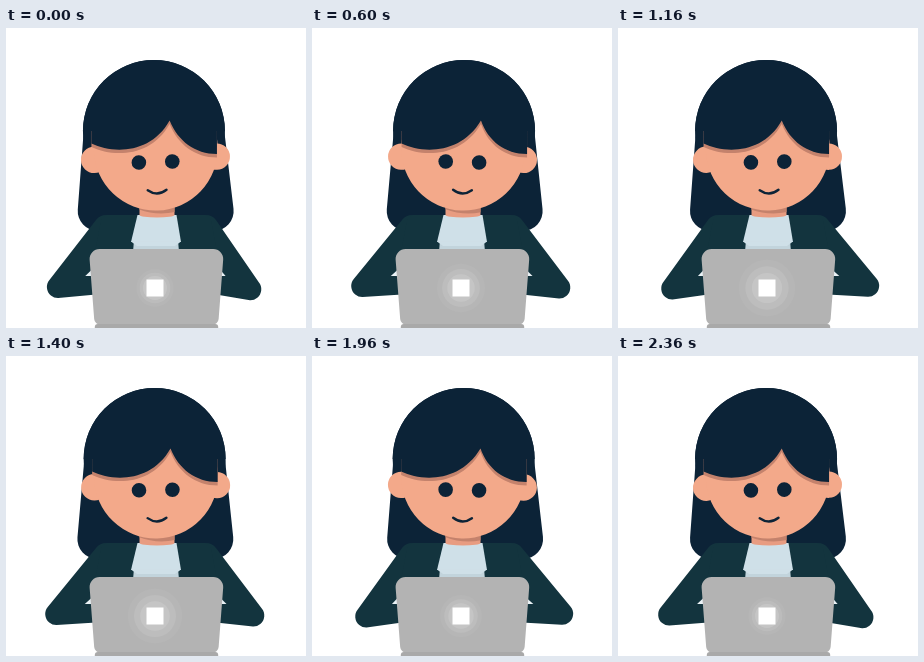
Recreate the animation shown at these times as an HTML page with a canvas. Size 300 by 300 pixels, loop 2400 ms.

```html
<!DOCTYPE html>
<html lang="en">
<head>
<meta charset="utf-8">
<style>
html, body { margin: 0; width: 100%; height: 100%; overflow: hidden; background: #fff; }
canvas { display: block; width: 300px; height: 300px; }
</style>
</head>
<body>
<canvas id="stage"></canvas>
<script>
const canvas = document.getElementById('stage');
const ctx = canvas.getContext('2d');
const ratio = window.devicePixelRatio || 1;
canvas.width = canvas.height = 300 * ratio;

const HAIR = '#0c2337', SKIN = '#f3a98a', NECK = '#e89c81', SHADE = '#c4826c';
const JACKET = '#13343e', SHIRT = '#cfe0e8', SHIRT_DARK = '#c2d4dc', METAL = '#b3b3b3';
const LOOP = 2400, STEP = 40, MIDDLE = 150;

// Swings between -1 and 1, reaching 1 at time `peak`.
const swing = (t, period, peak) => Math.cos((t - peak) / period * 2 * Math.PI);

function fill(color, build) {
  ctx.fillStyle = color;
  ctx.beginPath();
  build();
  ctx.fill();
}

const disc = (color, x, y, r) => fill(color, () => ctx.arc(x, y, r, 0, Math.PI * 2));

function pair(color, x, half, y, r) {
  for (const side of [-1, 1]) disc(color, x + side * half, y, r);
}

// Symmetric trapezoid; `top` and `bottom` give y, half width and corner radius.
function trapezoid(color, topX, top, bottomX, bottom) {
  const [y1, w1, r1] = top, [y2, w2, r2] = bottom;
  fill(color, () => {
    ctx.moveTo(topX, y1);
    ctx.arcTo(topX + w1, y1, bottomX + w2, y2, r1);
    ctx.arcTo(bottomX + w2, y2, bottomX - w2, y2, r2);
    ctx.arcTo(bottomX - w2, y2, topX - w1, y1, r2);
    ctx.arcTo(topX - w1, y1, topX, y1, r1);
    ctx.closePath();
  });
}

function transformed(build, x, y, angle = 0, flip = 1) {
  ctx.save();
  ctx.translate(x, y);
  ctx.rotate(angle);
  ctx.scale(flip, 1);
  build();
  ctx.restore();
}

function backHair(head, tips) {
  disc(HAIR, MIDDLE + head, 103, 71);
  trapezoid(HAIR, MIDDLE + head, [100, 70, 0], MIDDLE + tips, [203, 80, 20]);
}

// Drawn outwards from the body's axis; `reach` moves the elbow out and up.
function arm(side, reach) {
  transformed(() => {
    fill(JACKET, () => {
      ctx.moveTo(20, 187);
      ctx.lineTo(50, 187);
      ctx.quadraticCurveTo(56, 187, 60, 192);
      ctx.arc(97.3 + reach, 259.5 - reach * 0.6, 11, -0.69, 1.6);
      ctx.lineTo(60, 266.5);
    });
    fill('#eaf2f6', () => {
      ctx.moveTo(64, 241.5);
      ctx.lineTo(70.5 + reach * 0.3, 248);
      ctx.lineTo(64, 248);
    });
  }, MIDDLE, 0, 0, side);
}

function torso() {
  trapezoid(JACKET, MIDDLE, [187, 54, 8], MIDDLE, [240, 64, 0]);
  trapezoid(SHIRT_DARK, MIDDLE, [200, 21, 0], MIDDLE, [224, 23, 0]);
  trapezoid(SHIRT, MIDDLE + 1, [187, 19.5, 0], MIDDLE, [214, 25, 0]);
  trapezoid(SHIRT, MIDDLE, [213.5, 25, 0], MIDDLE, [218, 19, 0]);
}

function neck(head) {
  ctx.save();
  ctx.beginPath();
  ctx.rect(133.5, 170, 35, 17);
  ctx.ellipse(151, 187, 17.5, 2.5, 0, 0, Math.PI);
  ctx.clip();
  ctx.fillStyle = NECK;
  ctx.fillRect(130, 168, 42, 25);
  disc(SHADE, 156 + head * 0.3, 122, 63.5);
  ctx.restore();
}

// Two locks meeting at a parting, closed over the top of the head.
function fringe(color, parting, drop, radius) {
  fill(color, () => {
    ctx.moveTo(-62.5, 12.5 + drop);
    ctx.bezierCurveTo(-41, 23 + drop, -3, 23 + drop, parting, -10.5 + drop);
    ctx.bezierCurveTo(24, 10 + drop, 41, 23 + drop, 63, 23 + drop);
    ctx.lineTo(63, 0);
    ctx.arc(0, 0, radius, 0, Math.PI, true);
    ctx.lineTo(-62.5, 0);
  });
}

function features() {
  pair(HAIR, 0, 16.7, -16, 7.3);
  ctx.strokeStyle = HAIR;
  ctx.lineWidth = 2.4;
  ctx.lineCap = 'round';
  ctx.beginPath();
  ctx.moveTo(-8.6, 12);
  ctx.quadraticCurveTo(0.8, 19, 10.2, 12);
  ctx.stroke();
}

function face(head, angle) {
  transformed(() => {
    pair(SKIN, 0, 61.3, -19.8, 13.2);
    disc(SKIN, 0.5, -29.5, 62);
  }, MIDDLE, 150, angle);
  transformed(() => {
    const parting = 16.3 + head * 0.3;
    fringe(SHADE, parting, 3.4, 60);
    fringe(HAIR, parting, 0, 71);
  }, MIDDLE + head, 103);
  transformed(features, MIDDLE, 150, angle);
}

function laptop(pulse) {
  trapezoid(METAL, MIDDLE + 0.4, [221, 67.6, 10], MIDDLE + 0.4, [296.5, 61.8, 6]);
  trapezoid('#a9a9a9', MIDDLE + 0.5, [296, 61.7, 3], MIDDLE + 0.5, [306, 61.7, 0]);
  for (const ring of [1, 2, 3]) {
    const radius = 8.5 + 5 * ring + pulse * ring * 1.6;
    disc(`rgba(255,255,255,${0.19 - 0.05 * ring})`, 149, 260, radius);
  }
  ctx.fillStyle = '#fff';
  ctx.fillRect(140.5, 251.5, 17, 17);
}

function draw(t) {
  const sway = swing(t, 1200, 635);
  const head = 2.1 * sway;
  ctx.setTransform(ratio, 0, 0, ratio, 0, 0);
  ctx.fillStyle = '#fff';
  ctx.fillRect(0, 0, 300, 300);
  backHair(head, 1.5 + 2 * swing(t, 1200, 760));
  arm(-1, 2.6 * swing(t, 800, 640));
  arm(1, 3 * swing(t, 800, 400));
  torso();
  neck(head);
  face(head, 0.027 * sway);
  laptop(swing(t, LOOP, 1150));
}

const start = performance.now();
function tick() {
  const t = (performance.now() - start) % LOOP;
  draw(Math.floor(t / STEP) * STEP);
  requestAnimationFrame(tick);
}
tick();
</script>
</body>
</html>
```
